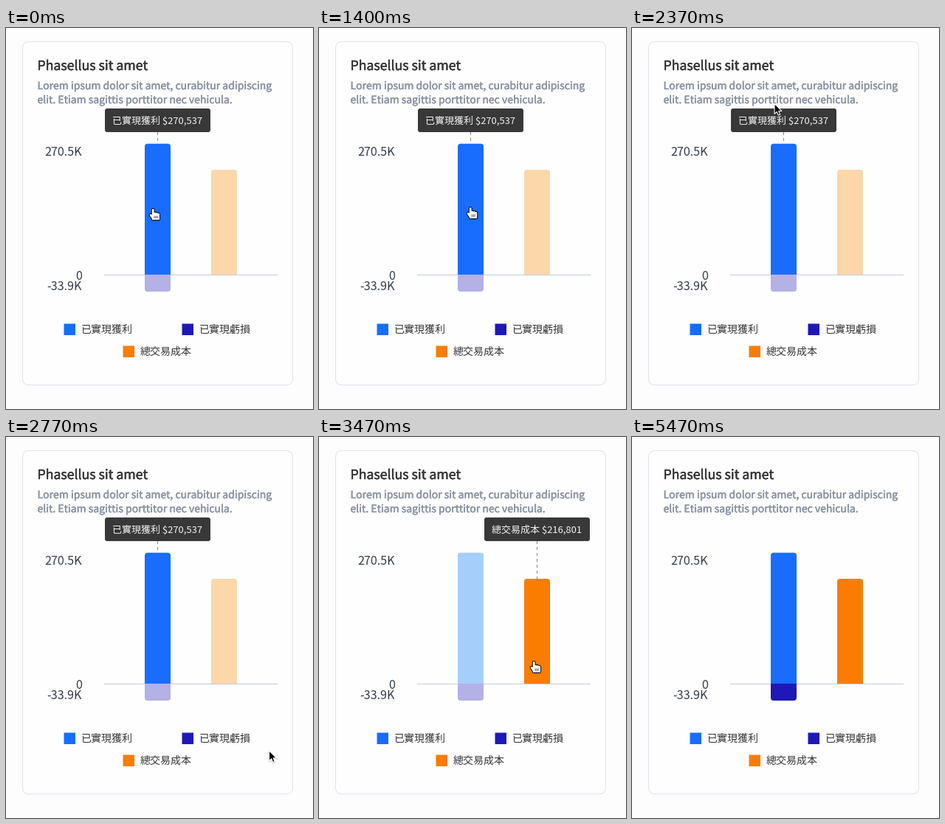
These frames come from a looping animation (416x516 px, 5610 ms). A matplotlib script:

```python
import numpy as np
import matplotlib.pyplot as plt
from matplotlib.animation import FuncAnimation
from matplotlib.patches import FancyBboxPatch, PathPatch, Polygon, Rectangle
from matplotlib.patheffects import withStroke
from matplotlib.path import Path
from matplotlib.transforms import Affine2D

W, H, DPI = 416, 516, 64
PX = 72 / DPI  # points per pixel
STEP, LOOP = 30, 5610

INK, MUTED, LABEL = "#363636", "#8993a4", "#333c49"
BLUE, NAVY, ORANGE = "#186dff", "#1e19b6", "#fa7d00"
PALE_BLUE, PALE_NAVY, PALE_ORANGE = "#a5cffb", "#b3b1e6", "#fcd7aa"

BAR_W = 35
BLUE_X, ORANGE_X = 188, 278
BASE, BLUE_TOP, ORANGE_TOP, NAVY_END = 334, 156.7, 192, 357

# Clicks that move and clear the selection, and the pointer's exit
SELECT_COST, CLEAR, GONE = 3210, 4260, 4830

# Places where the pointer pauses
START, HOVER, COST = (197.5, 244.5), (203.5, 242.5), (289.5, 303.5)
OUTSIDE, REST, EXIT = (324, 343.5), (348, 370), (394, 385)

plt.rcParams["font.family"] = "Noto Sans CJK JP"
plt.rcParams["path.snap"] = False
fig = plt.figure(figsize=(W / DPI, H / DPI), dpi=DPI, facecolor="#fdfdfd")
ax = fig.add_axes([0, 0, 1, 1])
ax.set(xlim=(0, W), ylim=(H, 0))
ax.axis("off")


def label(x, y, text, size, color, ha="left", bold=0, z=3):
    art = ax.text(x, y, text, size=size * PX, color=color, ha=ha,
                  va="baseline", zorder=z, parse_math=False)
    if bold:
        art.set_path_effects([withStroke(linewidth=bold * PX, foreground=color)])
    return art


def round_box(x, y, w, h, r, **style):
    shape = f"round,pad=0,rounding_size={r}"
    return ax.add_patch(FancyBboxPatch((x, y), w, h, boxstyle=shape, **style))


def bar(x, tip, color):
    """Column from the base line with rounded corners at its tip."""
    r = 4
    d = r if tip < BASE else -r
    right = x + BAR_W
    points = [(x, BASE), (x, tip + d), (x, tip), (x + r, tip),
              (right - r, tip), (right, tip), (right, tip + d),
              (right, BASE), (x, BASE)]
    codes = [Path.MOVETO, Path.LINETO, Path.CURVE3, Path.CURVE3,
             Path.LINETO, Path.CURVE3, Path.CURVE3, Path.LINETO,
             Path.CLOSEPOLY]
    return ax.add_patch(PathPatch(Path(points, codes), fc=color, lw=0, zorder=2))


def tooltip(bar_x, tip, text):
    mid = bar_x + BAR_W / 2
    stem, = ax.plot([mid, mid], [141, tip], color="#858585", lw=PX,
                    dashes=(4, 4), dash_capstyle="butt", zorder=4)
    box = round_box(mid - 71.5, 109, 143, 32, 3, fc="#383838", lw=0, zorder=4)
    words = label(mid - 62, 130, text, 13, "#f2f2f2", z=5)
    return [stem, box, words]


# Card and headings
round_box(22.5, 18.5, 366, 465, 9, fc="#fefefe", ec="#e1e3ed", lw=PX, zorder=1)
label(42.5, 57, "Phasellus sit amet", 17.7, INK, bold=0.5)
label(42.5, 83, "Lorem ipsum dolor sit amet, curabitur adipiscing", 14, MUTED, bold=0.45)
label(42.5, 102, "elit. Etiam sagittis porttitor nec vehicula.", 14, MUTED, bold=0.45)

# Chart
for y, text in ((173, "270.5K"), (341, "0"), (355, "-33.9K")):
    label(103, y, text, 16.2, LABEL, ha="right")
ax.plot([133, 368], [BASE + 0.5] * 2, color="#bfcdd8", lw=PX,
        solid_capstyle="butt", zorder=1.5)
gain = bar(BLUE_X, BLUE_TOP, BLUE)
loss = bar(BLUE_X, NAVY_END, NAVY)
cost = bar(ORANGE_X, ORANGE_TOP, ORANGE)

# Legend
for x, y, color, text in ((79, 401, BLUE, "已實現獲利"),
                          (239, 401, NAVY, "已實現虧損"),
                          (159, 431, ORANGE, "總交易成本")):
    ax.add_patch(Rectangle((x - 0.5, y - 0.5), 15.5, 15.5, fc=color, lw=0, zorder=2))
    label(x + 22.5, y + 12, text, 14, INK)

gain_tip = tooltip(BLUE_X, BLUE_TOP, "已實現獲利 $270,537")
cost_tip = tooltip(ORANGE_X, ORANGE_TOP, "總交易成本 $216,801")

# Pointers are drawn around their hot spot and moved by one shared shift
shift = Affine2D()
MOVED = shift + ax.transData


def arrow_shape(dy, fc, ec, lw, alpha=1.0, z=8):
    points = [(0, 0), (0, 13.8), (3.1, 10.9), (5.2, 15.6), (7.6, 14.6),
              (5.6, 10), (9.8, 9.8)]
    return ax.add_patch(Polygon(np.add(points, (0, dy)), fc=fc, ec=ec,
                                lw=lw * PX, alpha=alpha, zorder=z,
                                joinstyle="round", transform=MOVED))


def strokes(segments, color, lw, z=8):
    """Round-ended strokes (x0, y0, x1, y1) as a single line."""
    xs = [v for x0, _, x1, _ in segments for v in (x0, x1, np.nan)]
    ys = [v for _, y0, _, y1 in segments for v in (y0, y1, np.nan)]
    return ax.plot(xs, ys, color=color, lw=lw * PX, solid_capstyle="round",
                   zorder=z, transform=MOVED, scalex=False, scaley=False)[0]


arrow = [arrow_shape(1, "black", "black", w, 0.07, 7) for w in (1, 3)]
arrow.append(arrow_shape(0, "black", "white", 1.1))

fingers = [(1.7 + 2.5 * k, top, 1.7 + 2.5 * k, 14.2)
           for k, top in enumerate((1.8, 6.6, 7, 7.8))]
fingers.append((-1.5, 8.8, 1.7, 13))
creases = [(3.6 + 2 * k, 10.2, 3.6 + 2 * k, 13) for k in range(3)]
hand = [strokes(fingers, "black", 4.7), strokes(fingers, "white", 2.8, 9),
        strokes(creases, "black", 0.7, 10)]


def ease(t, start, end):
    u = np.clip((t - start) / (end - start), 0, 1)
    return u * u * (3 - 2 * u)


def mix(a, b, s):
    return np.multiply(a, 1 - s) + np.multiply(b, s)


def orbit(cx, cy, rx, ry, angle):
    """Point on a counter-clockwise ellipse, angle 0 at the right."""
    return cx + rx * np.cos(angle), cy - ry * np.sin(angle)


def pointer_at(t):
    if t < 1530:
        # Two quick laps around the chart, then back onto the bar
        lap = orbit(185, 255, 125, 173, 2 * np.pi * (t - 90) / 540)
        pos = mix(START, lap, ease(t, 0, 110))
        return mix(pos, HOVER, ease(t, 1030, 1340))
    if t < 3540:
        # A wider lap that drifts to the right and ends on the cost bar
        drift = ease(t, 1950, 2760)
        lap = orbit(120 + 157 * drift, 284 + 11 * drift, 110, 188,
                    3.785 + 0.0099 * (t - 1950))
        pos = mix(HOVER, lap, ease(t, 1530, 1950))
        return mix(pos, COST, ease(t, 2770, 3350))
    # One lap from the cost bar, a click beside it, then out to the right
    lap = orbit(185.5, 262, 108, 152, -0.28 + 2 * np.pi * ease(t, 3540, 4150))
    pos = mix(lap, OUTSIDE, ease(t, 4080, 4250))
    pos = mix(pos, REST, ease(t, 4290, 4490))
    return mix(pos, EXIT, ease(t, 4680, 4800))


def over_bar(x, y):
    on_blue = BLUE_X <= x <= BLUE_X + BAR_W and BLUE_TOP <= y <= NAVY_END
    on_orange = ORANGE_X <= x <= ORANGE_X + BAR_W and ORANGE_TOP <= y <= BASE
    return on_blue or on_orange


def show(parts, visible):
    for art in parts:
        art.set_visible(visible)


def draw(i):
    t = i * STEP
    on_gain = t < SELECT_COST
    on_cost = SELECT_COST <= t < CLEAR
    gain.set_facecolor(PALE_BLUE if on_cost else BLUE)
    cost.set_facecolor(PALE_ORANGE if on_gain else ORANGE)
    loss.set_facecolor(PALE_NAVY if on_gain or on_cost else NAVY)
    show(gain_tip, on_gain)
    show(cost_tip, on_cost)

    pos = pointer_at(t)
    is_hand = over_bar(*pos)
    shift.clear().translate(*pos)
    show(hand, t < GONE and is_hand)
    show(arrow, t < GONE and not is_hand)
    return []


anim = FuncAnimation(fig, draw, frames=LOOP // STEP, interval=STEP,
                     repeat=True, repeat_delay=0, blit=False)
plt.show()
```
